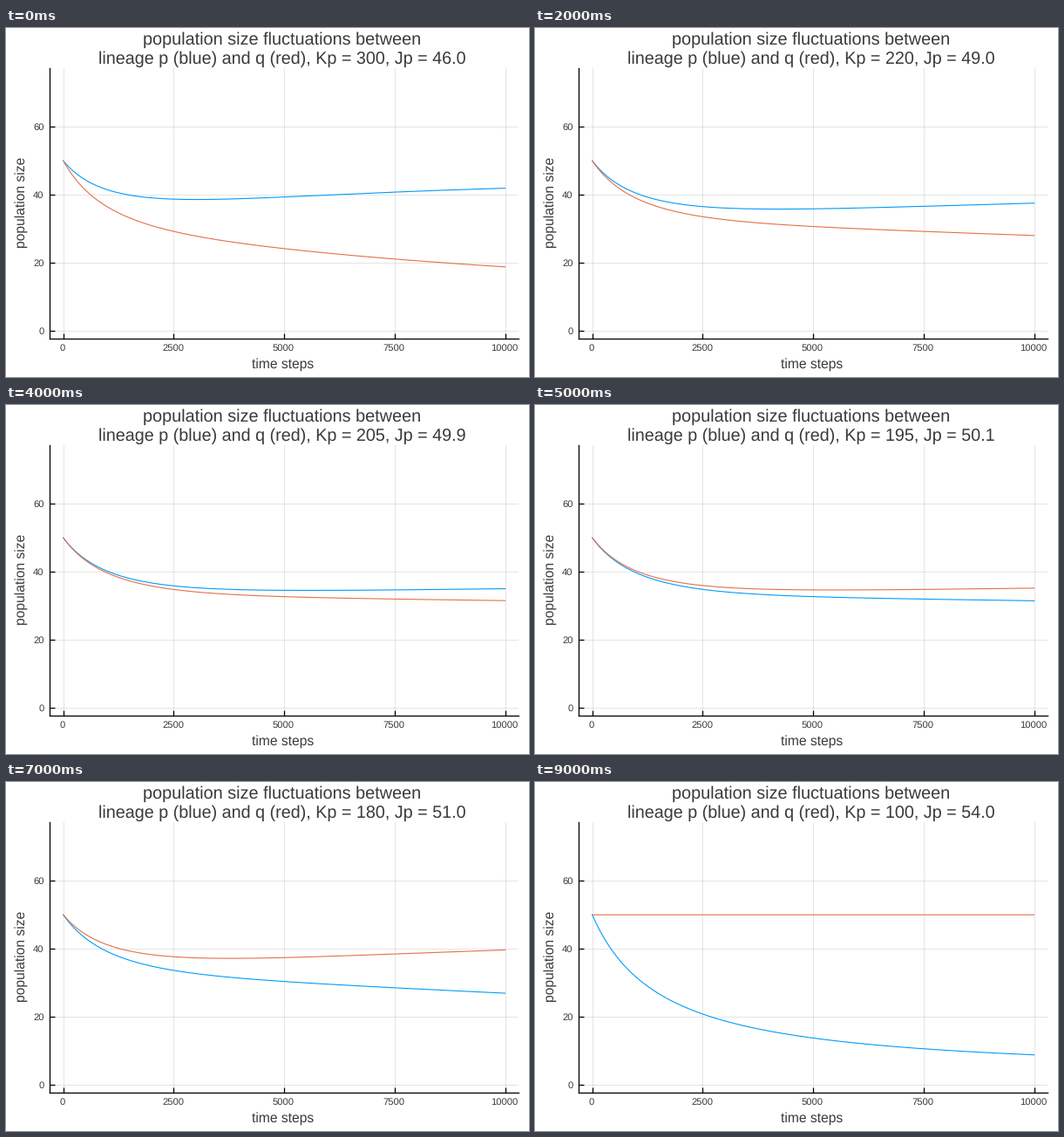
A matplotlib script for the animation above (10000 ms loop, 600 px wide and 400 px high).

```python
import numpy as np
import matplotlib.pyplot as plt
from matplotlib.animation import FuncAnimation

W, H, DPI = 600, 400, 100
PX = 72 / DPI
INK = "#3a3a3a"

KS = [300, 250, 220, 210, 205, 195, 190, 180, 150, 100]
JS = [46.0, 48.0, 49.0, 49.5, 49.9, 50.1, 50.5, 51.0, 52.0, 54.0]
KQ, JQ = 200, 50.0
RATE, START, STEPS, DT = 0.0007, 50.0, 10000, 5

# Pixel position of the data point (0, 0) and pixels per unit
X0, Y0, SX, SY = 65.7, 347.2, 0.0507, 3.9
LEFT, RIGHT, TOP, BOTTOM = 50.0, 588, 46, 356.3

plt.rcParams.update({
    "font.family": "Liberation Sans",
    "text.hinting": "none",
    "text.color": INK,
    "axes.linewidth": 1.3 * PX,
})


def simulate(kp, jp):
    """Two logistic lineages; competition is shared by spare capacity."""
    p = q = START
    wp, wq = kp - 2 * START, KQ - 2 * START
    path = [(p, q)]
    for _ in range(STEPS // DT):
        on_q = wp * p / (wp * p + wq * q)
        on_p = 1 - on_q
        dp = RATE * p * (1 - (p + on_p * q) / jp)
        dq = RATE * q * (1 - (q + on_q * p) / JQ)
        p, q = p + DT * dp, q + DT * dq
        path.append((p, q))
    return np.array(path).T


def label(x, y, text, size, **kw):
    opts = dict(ha="center", va="baseline") | kw
    return fig.text(x / W, 1 - y / H, text, fontsize=size * PX, **opts)


fig = plt.figure(figsize=(W / DPI, H / DPI), dpi=DPI, facecolor="white")
ax = fig.add_axes([LEFT / W, 1 - BOTTOM / H,
                   (RIGHT - LEFT) / W, (BOTTOM - TOP) / H])
ax.set_xlim((LEFT - X0) / SX, (RIGHT - X0) / SX)
ax.set_ylim((Y0 - BOTTOM) / SY, (Y0 - TOP) / SY)
ax.set_xticks(range(0, 10001, 2500), [])
ax.set_yticks(range(0, 61, 20), [])
ax.tick_params(direction="in", length=6 * PX, width=1.3 * PX)
ax.spines[["top", "right"]].set_visible(False)
ax.grid(color="black", alpha=0.1, linewidth=1 * PX)
ax.set_axisbelow(True)

for t in range(0, 10001, 2500):
    label(X0 - 1 + SX * t, 370, str(t), 11.2)
for n in range(0, 61, 20):
    label(43.6, Y0 + 3.9 - SY * n, str(n), 11.2, ha="right")

label(318, 390, "time steps", 15.6)
label(25, 199.6, "population size", 15.6, rotation=90,
      ha="right", va="center")
label(316.7, 19, "population size fluctuations between", 19.9)
title = label(317.1, 41, "", 19.8)

time = np.arange(0, STEPS + 1, DT)
runs = [simulate(k, j) for k, j in zip(KS, JS)]
blue, = ax.plot([], [], color="#009afa", lw=1.1 * PX)
red, = ax.plot([], [], color="#e36f47", lw=1.1 * PX)


def draw(i):
    p, q = runs[i]
    blue.set_data(time, p)
    red.set_data(time, q)
    title.set_text(f"lineage p (blue) and q (red), Kp = {KS[i]}, Jp = {JS[i]}")
    return blue, red, title


anim = FuncAnimation(fig, draw, frames=len(KS), interval=1000, repeat=True)
plt.show()
```
